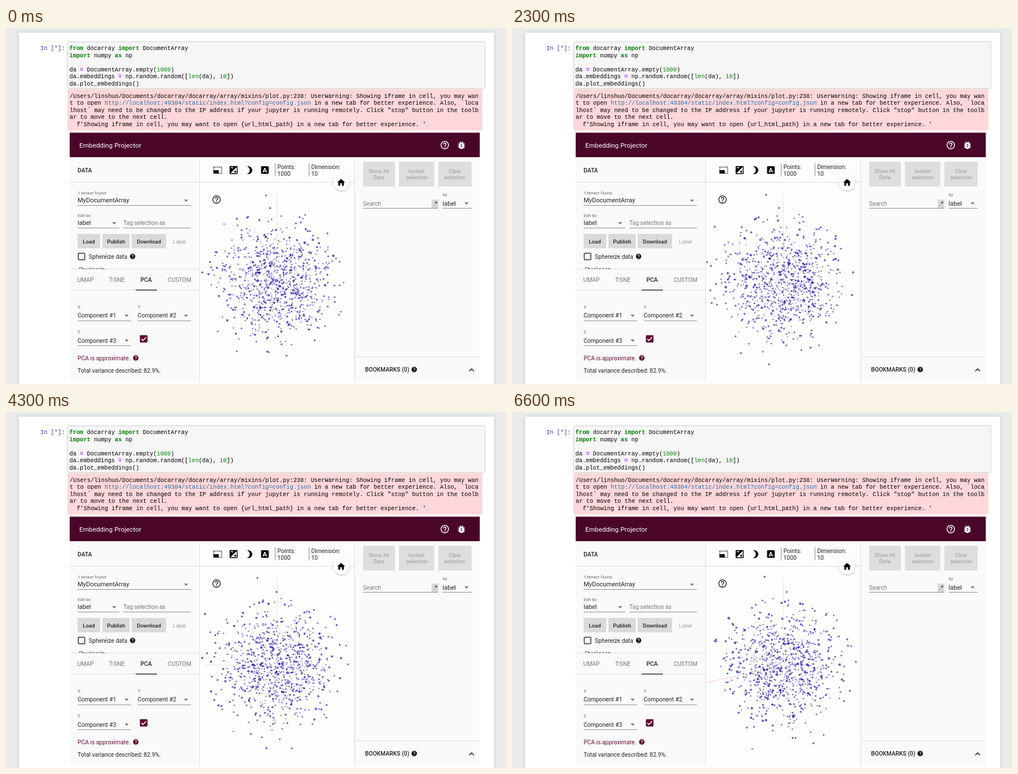
Recreate the animation shown at these times as an HTML page with a canvas. Size 887x631 px, loop 6.7 s.

```html
<!DOCTYPE html>
<html lang="en">
<head>
<meta charset="utf-8">
<title>Embedding plot</title>
<style>
html, body { margin: 0; width: 100%; height: 100%; overflow: hidden; background: #ebebeb; }
svg, canvas { position: absolute; left: 0; top: 0; display: block; }
canvas { left: 344px; top: 274px; }
text { font: 10.35px Roboto, sans-serif; fill: #222; white-space: pre; }
.code text { font: 10.34px "Liberation Mono", monospace; fill: #000; }
.code .kw { fill: #008000; font-weight: bold; }
.code .num { fill: #008000; }
.code .op { fill: #a2f; font-weight: bold; }
text.b, .b text { font-weight: 500; }
text.mid, .mid text { text-anchor: middle; }
.btn text { font-size: 9.6px; }
.off text, text.off { fill: #9b9b9b; }
.cap { font-size: 7.8px; fill: #666; }
.val { font-size: 11.1px; }
.soft { fill: #747474; }
.rule { stroke: #dedede; fill: none; }
.under { stroke: #8c8c8c; fill: none; }
</style>
</head>
<body>
<svg width="887" height="631">
  <defs>
    <symbol id="ask" viewBox="0 0 24 24"><path d="M11 18h2v-2h-2v2zm1-16C6.48 2 2 6.48 2 12s4.48 10 10 10 10-4.48 10-10S17.52 2 12 2zm0 18c-4.41 0-8-3.59-8-8s3.59-8 8-8 8 3.59 8 8-3.59 8-8 8zm0-14c-2.21 0-4 1.79-4 4h2c0-1.1.9-2 2-2s2 .9 2 2c0 2-3 1.75-3 5h2c0-2.25 3-2.5 3-5 0-2.21-1.79-4-4-4z"/></symbol>
    <symbol id="help" viewBox="0 0 24 24"><path d="M12 2C6.48 2 2 6.48 2 12s4.48 10 10 10 10-4.48 10-10S17.52 2 12 2zm1 17h-2v-2h2v2zm2.07-7.75l-.9.92C13.45 12.9 13 13.5 13 15h-2v-.5c0-1.1.45-2.1 1.17-2.83l1.24-1.26c.37-.36.59-.86.59-1.41 0-1.1-.9-2-2-2s-2 .9-2 2H8c0-2.21 1.79-4 4-4s4 1.79 4 4c0 .88-.36 1.68-.93 2.25z"/></symbol>
    <symbol id="bug" viewBox="0 0 24 24"><path d="M20 8h-2.81c-.45-.78-1.07-1.45-1.82-1.96L17 4.41 15.59 3l-2.17 2.17C12.96 5.06 12.49 5 12 5c-.49 0-.96.06-1.41.17L8.41 3 7 4.41l1.62 1.63C7.88 6.55 7.26 7.22 6.81 8H4v2h2.09c-.05.33-.09.66-.09 1v1H4v2h2v1c0 .34.04.67.09 1H4v2h2.81c1.04 1.79 2.97 3 5.19 3s4.15-1.21 5.19-3H20v-2h-2.09c.05-.33.09-.66.09-1v-1h2v-2h-2v-1c0-.34-.04-.67-.09-1H20V8zm-6 8h-4v-2h4v2zm0-4h-4v-2h4v2z"/></symbol>
    <symbol id="night" viewBox="0 0 24 24"><path d="M9 2c-1.05 0-2.05.16-3 .46 4.06 1.27 7 5.06 7 9.54 0 4.48-2.94 8.27-7 9.54.95.3 1.95.46 3 .46 5.52 0 10-4.48 10-10S14.52 2 9 2z"/></symbol>
    <symbol id="exposure" viewBox="0 0 24 24"><path d="M15 17v2h2v-2h2v-2h-2v-2h-2v2h-2v2h2zm5-15H4c-1.1 0-2 .9-2 2v16c0 1.1.9 2 2 2h16c1.1 0 2-.9 2-2V4c0-1.1-.9-2-2-2zM5 5h6v2H5V5zm15 15H4L20 4v16z"/></symbol>
    <path id="drop" d="M-3.7-1.8h7.4L0 1.9z" fill="#777"/>
    <filter id="shade" x="-30%" y="-30%" width="160%" height="160%"><feDropShadow dx="0" dy="1" stdDeviation="1.5" flood-opacity=".3"/></filter>
    <filter id="glow"><feDropShadow dx="0" dy="0" stdDeviation="3" flood-opacity=".16"/></filter>
  </defs>

  <rect x="23" y="8.5" width="843" height="700" fill="#fff" filter="url(#glow)"/>
  <rect x="109.5" y="24.5" width="740" height="83" rx="1" fill="#f6f6f6" stroke="#cfcfcf"/>
  <rect x="109" y="108.5" width="736" height="73" fill="#fdd7d9"/>

  <g class="code">
    <text x="61" y="39" style="fill:#303f9f">In [*]:</text>
    <text x="112.5" y="39"><tspan class="kw">from</tspan> docarray <tspan class="kw">import</tspan> DocumentArray</text>
    <text x="112.5" y="51.5"><tspan class="kw">import</tspan> numpy <tspan class="kw">as</tspan> np</text>
    <text x="112.5" y="76.5">da <tspan class="op">=</tspan> DocumentArray.empty(<tspan class="num">1000</tspan>)</text>
    <text x="112.5" y="89">da.embeddings <tspan class="op">=</tspan> np.random.random([<tspan class="num">len</tspan>(da), <tspan class="num">10</tspan>])</text>
    <text x="112.5" y="101.5">da.plot_embeddings()</text>
    <text x="113" y="123.5">/Users/linshuo/Documents/docarray/docarray/array/mixins/plot.py:238: UserWarning: Showing iframe in cell, you may wan</text>
    <text x="113" y="136">t to open <tspan fill="#296eaa">http://localhost:49304/static/index.html?config=config.json</tspan> in a new tab for better experience. Also, `loca</text>
    <text x="113" y="148.5">lhost` may need to be changed to the IP address if your jupyter is running remotely. Click "stop" button in the toolb</text>
    <text x="113" y="161">ar to move to the next cell.</text>
    <text x="125.4" y="173.5">f'Showing iframe in cell, you may want to open {url_html_path} in a new tab for better experience. '</text>
  </g>

  <!-- panels -->
  <path fill="#fafafa" d="M113 229H343.500V627H113zM618.500 229H840.500V627H618.500z"/>
  <path fill="#fdfdfd" d="M344 229H618V274H344z"/>
  <path class="rule" d="M343.500 229V627M618.500 229V627M113 273.500H618M619 583H840.500"/>
  <rect x="113" y="185.500" width="727.500" height="43.500" fill="#4a0628"/>
  <text x="130" y="212" style="font-size:11.8px;fill:#fff">Embedding Projector</text>
  <use href="#ask" x="769.600" y="198.800" width="17.600" height="17.600" fill="#fff"/>
  <use href="#bug" x="799.200" y="199" width="17.600" height="17.600" fill="#fff"/>

  <!-- data column -->
  <text class="b" x="127" y="256">DATA</text>
  <text class="cap" x="127" y="295">1 tensor found</text>
  <text class="val" x="127" y="309">MyDocumentArray</text>
  <text class="cap" x="127" y="335">Edit by</text>
  <text class="val" x="127" y="349">label</text>
  <text class="soft" x="208" y="349">Tag selection as</text>
  <path class="under" d="M127 314.500H328M127 354.500H201M208 354.500H328M127 519H222M234 519H328M127 563H222"/>
  <use href="#drop" x="319.500" y="306"/>
  <use href="#drop" x="192" y="346"/>
  <path fill="#dadada" d="M127 365h40v25.500h-40zM171 365h48.500v25.500H171zM223 365h61v25.500h-61z"/>
  <g class="btn b mid">
    <text x="147" y="381.500">Load</text>
    <text x="195.300" y="381.500">Publish</text>
    <text x="253.500" y="381.500">Download</text>
  </g>
  <g class="btn off"><text x="296" y="381.500">Label</text></g>
  <rect x="128.200" y="399.200" width="11.600" height="11.600" rx="1" fill="none" stroke="#333" stroke-width="1.500"/>
  <text x="147" y="409">Sphereize data</text>
  <use href="#help" x="219" y="399.400" width="11.200" height="11.200" fill="#111"/>
  <text x="129" y="430.500" style="font-size:8.9px">Checkpoint:</text>
  <path fill="#fafafa" d="M113 427.500h230v37H113z"/>
  <path class="rule" d="M113 427.500H343M113 464.500H343"/>
  <text class="soft" x="126.500" y="450">UMAP</text>
  <text class="soft" x="183" y="450">T-SNE</text>
  <text class="b" x="238.500" y="450">PCA</text>
  <text class="soft" x="287" y="450">CUSTOM</text>
  <path d="M230 464.500h37.500" stroke="#3b1d2d" stroke-width="1.500"/>
  <text class="cap" x="127" y="497">X</text>
  <text class="cap" x="234" y="497">Y</text>
  <text class="cap" x="127" y="541">Z</text>
  <text x="127" y="513">Component #1</text>
  <text x="233.500" y="513">Component #2</text>
  <text x="127" y="557.500">Component #3</text>
  <use href="#drop" x="214" y="510"/>
  <use href="#drop" x="319.500" y="510"/>
  <use href="#drop" x="214" y="554"/>
  <rect x="237.500" y="544.500" width="13.500" height="13" rx="1.500" fill="#5c0a34"/>
  <path d="M240 551l3 3 5.500-6" fill="none" stroke="#fff" stroke-width="1.600"/>
  <text x="127" y="588.500" style="fill:#6b0f3c">PCA is approximate.</text>
  <use href="#help" x="224.500" y="579" width="11.600" height="11.600" fill="#5c0a34"/>
  <text x="127" y="610.500">Total variance described: 82.9%.</text>

  <!-- plot toolbar -->
  <rect x="368.500" y="246.500" width="14" height="11" fill="none" stroke="#111" stroke-width="1.500" stroke-dasharray="1.600 1.400"/>
  <path d="M368 252h9.500v6H368z" fill="#111"/>
  <use href="#exposure" x="395.300" y="243.300" width="17" height="17"/>
  <use href="#night" x="423.300" y="243.500" width="17" height="17"/>
  <rect x="452.500" y="245" width="13.500" height="13.500" rx="1.500"/>
  <text class="mid" x="459.200" y="256" style="font-size:11.5px;font-weight:700;fill:#fff">A</text>
  <path d="M477.500 240v23M537.500 240v23" stroke="#8a8a8a"/>
  <text x="481.500" y="249.500">Points:</text>
  <text x="481.500" y="261.500">1000</text>
  <text x="541.500" y="249.500">Dimension:</text>
  <text x="541.500" y="261.500">10</text>

  <!-- selection column -->
  <path fill="#dedede" d="M633.500 237h56.500v44h-56.500zM697 237h63v44h-63zM767 237h59v44h-59z"/>
  <g class="btn mid off">
    <text x="661.500" y="257">Show All</text><text x="661.500" y="268">Data</text>
    <text x="728.500" y="257">Isolate</text><text x="728.500" y="268">selection</text>
    <text x="796.500" y="257">Clear</text><text x="796.500" y="268">selection</text>
  </g>
  <text class="soft" x="633.500" y="314.500">Search</text>
  <rect x="755" y="304" width="12" height="15" fill="#d8d8d8"/>
  <text x="758" y="315">.*</text>
  <text class="cap" x="775" y="298">by</text>
  <text class="val" x="774.500" y="314.500">label</text>
  <path class="under" d="M633.500 319.500H767M774.500 319.500H826"/>
  <use href="#drop" x="817" y="311"/>
  <text class="b" x="637" y="609">BOOKMARKS (0)</text>
  <use href="#help" x="718.500" y="599.500" width="11.400" height="11.400" fill="#111"/>
  <path d="M821.800 608.300l4.200-4.200 4.200 4.200" fill="none" stroke="#222" stroke-width="1.600"/>
</svg>

<canvas id="plot" width="274" height="353"></canvas>

<svg width="887" height="631">
  <use href="#ask" x="364.700" y="295.200" width="17.600" height="17.600" fill="#222"/>
  <circle cx="594.500" cy="273.500" r="14.500" fill="#fff" filter="url(#shade)"/>
  <path transform="translate(586.100 265.400) scale(.7)" d="M10 20v-6h4v6h5v-8h3L12 3 2 12h3v8z"/>
</svg>

<script>
const ctx = document.getElementById('plot').getContext('2d');
const LOOP = 6700, STEP = 100, CX = 481, CY = 450, DIST = 240, AXIS = 132;
const SIN = 0.46, COS = Math.sqrt(1 - SIN * SIN);

// Orbit at 12 degrees per second; the red axis is side-on at 4.5 s.
const angle = t => (t - 4.5) * Math.PI / 15;

const turn = (x, z, a) => [
  x * Math.cos(a) + z * Math.sin(a),
  z * Math.cos(a) - x * Math.sin(a)
];

function project([x, y, z], t) {
  const [rx, rz] = turn(x, z, angle(t));
  const near = rz * COS + y * SIN;
  const zoom = DIST / (DIST - near);
  return { x: CX + rx * zoom, y: CY - (y * COS - rz * SIN) * zoom, zoom, near };
}

// Space position of a dot seen at screen x, y with a given zoom at time t.
function locate([t, x, y, zoom]) {
  const up = (CY - y) / zoom, near = DIST * (1 - 1 / zoom);
  const [px, pz] = turn((x - CX) / zoom, near * COS - up * SIN, -angle(t));
  return [px, up * COS + near * SIN, pz];
}

let seed = 20;
function random() {
  seed = (seed * 1664525 + 1013904223) % 4294967296;
  return seed / 4294967296;
}
const bell = () => (random() + random() + random() + random() - 2) * 83;

// Outlying dots, then a bell-shaped ball for the rest.
const points = [
  [4.3, 446, 294, 1.337], [4.3, 480, 319, 1.355], [4.3, 353, 358, 1.554],
  [4.3, 348, 436, 1.55], [4.3, 547, 545, 1.485], [4.3, 507, 596, 1.25],
  [4.3, 462, 596, 1.418], [0.6, 512, 578, 1.247], [3.2, 581, 406, 1.27],
  [5.85, 416, 588, 1.04]
].map(locate);
while (points.length < 1000) {
  const p = [bell(), bell(), bell()];
  if (Math.hypot(...p) < 118) points.push(p);
}

const axes = [
  [[-AXIS, 0, 0], '255,110,90'],
  [[0, AXIS, 0], '110,240,80'],
  [[0, 0, -AXIS], '130,130,255']
];

function drawAxis([tip, rgb], t) {
  const a = project([0, 0, 0], t), b = project(tip, t);
  const fade = ctx.createLinearGradient(a.x, a.y, b.x, b.y);
  [a, b].forEach((end, i) => {
    const alpha = Math.min(0.45, Math.max(0.08, 0.24 + end.near * 0.0035));
    fade.addColorStop(i, `rgba(${rgb},${alpha})`);
  });
  ctx.strokeStyle = fade;
  ctx.beginPath();
  ctx.moveTo(a.x, a.y);
  ctx.lineTo(b.x, b.y);
  ctx.stroke();
}

function draw(t) {
  ctx.setTransform(1, 0, 0, 1, -344, -274);
  ctx.globalCompositeOperation = 'source-over';
  ctx.globalAlpha = 1;
  ctx.fillStyle = '#fefefe';
  ctx.fillRect(344, 274, 274, 353);
  axes.forEach(axis => drawAxis(axis, t));
  ctx.globalCompositeOperation = 'multiply';
  ctx.fillStyle = '#665ecb';
  for (const point of points) {
    const { x, y, zoom } = project(point, t);
    ctx.globalAlpha = Math.min(1, 0.25 + 0.6 * zoom);
    ctx.beginPath();
    ctx.arc(x, y, 1.3 * zoom, 0, 7);
    ctx.fill();
  }
}

function tick() {
  draw(Math.floor(performance.now() % LOOP / STEP) * STEP / 1000);
  requestAnimationFrame(tick);
}
tick();
</script>
</body>
</html>
```
